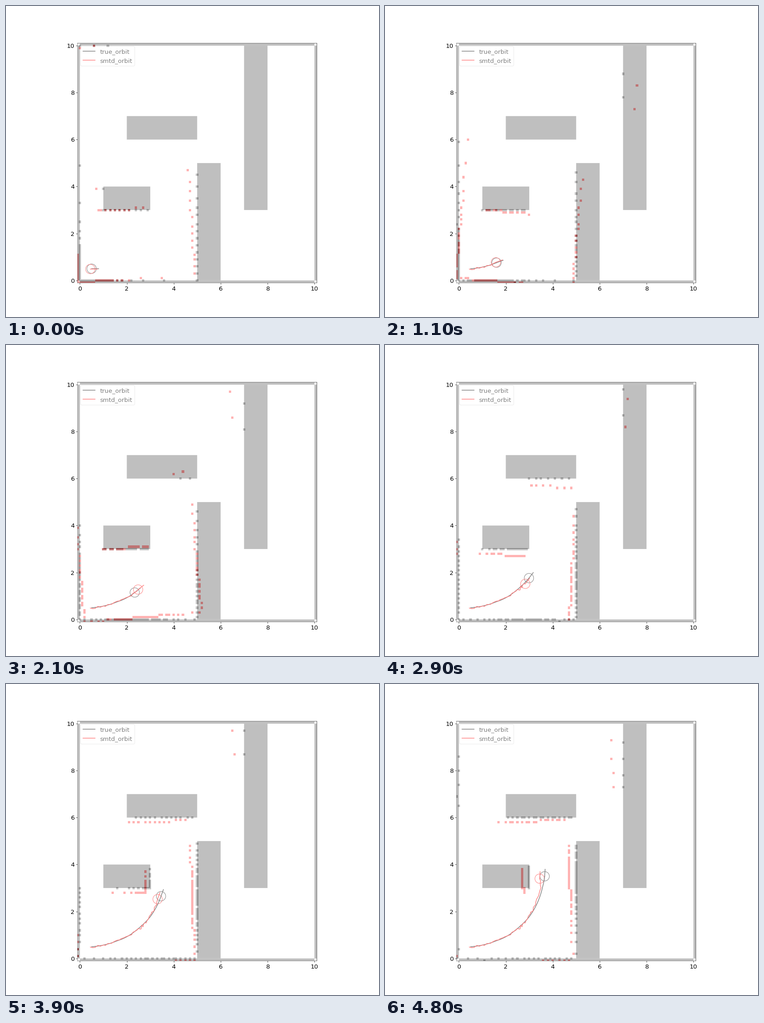
Animation, 820 px wide and 683 px high, one loop 4900 ms. Source, as a matplotlib script:

```python
import matplotlib.pyplot as plt
import numpy as np
from matplotlib.animation import FuncAnimation
from matplotlib.colors import ListedColormap
from matplotlib.patches import Circle, Rectangle

STEPS = 49
DPI = 64
S = 820 / 12 / DPI
SIZE, WALL = 10, 0.1
RADIUS, NOSE = 0.2, 0.3
TURN, SPEED = np.radians(1.8), 0.1
CELLS = 103

plt.rcParams.update({
    "font.family": "DejaVu Sans",
    "font.size": 14 * S,
    "path.snap": False,
    "lines.linewidth": 1.5 * S,
    "patch.linewidth": S,
    "axes.linewidth": 0.8 * S,
    **{f"{a}tick.major.{p}": v * S for a in "xy"
       for p, v in (("size", 3.5), ("width", 0.8), ("pad", 3.5))},
})

# Obstacles, then outer walls: x0, y0, x1, y1
BOXES = np.array([
    (1, 3, 3, 4), (2, 6, 5, 7), (5, 0, 6, 5), (7, 3, 8, SIZE),
    (-WALL, 0, 0, SIZE), (SIZE, 0, SIZE + WALL, SIZE),
    (0, -WALL, SIZE, 0), (0, SIZE, SIZE, SIZE + WALL),
])
RAYS = np.linspace(-np.pi, np.pi, 100)

# Key poses: step, true x and y, estimated x and y, estimated heading error
KEYS = np.array([
    (0, 0.5, 0.5, 0.445, 0.485, 0.061),
    (11, 1.605, 0.757, 1.575, 0.772, -0.088),
    (21, 2.337, 1.148, 2.483, 1.274, 0.086),
    (29, 2.987, 1.76, 2.832, 1.517, -0.05),
    (35, 3.3, 2.27, 3.16, 2.02, -0.01),
    (43, 3.57, 3.05, 3.452, 2.884, 0.023),
    (48, 3.657, 3.5, 3.442, 3.398, 0.04),
])

step = np.arange(STEPS)
key_steps = KEYS[:, 0].astype(int)
heading = TURN * step


def pin(path, targets):
    """Shift each column of path smoothly so it meets the key values."""
    gaps = (targets - path[key_steps]).T
    return path + np.column_stack([np.interp(step, key_steps, g) for g in gaps])


def ranges(p):
    """Distance from p to the nearest box along every ray."""
    x0, y0, x1, y1 = BOXES.T[:, :, None]
    c, s = np.cos(RAYS), np.sin(RAYS)
    tx = np.sort([(x0 - p[0]) / c, (x1 - p[0]) / c], axis=0)
    ty = np.sort([(y0 - p[1]) / s, (y1 - p[1]) / s], axis=0)
    near, far = np.maximum(tx[0], ty[0]), np.minimum(tx[1], ty[1])
    return np.where((near <= far) & (near > 0), near, 2 * SIZE).min(axis=0)


def hit_grid(p, dist, turn=0.0):
    """Mark the cells where the rays end."""
    x = p[0] + dist * np.cos(RAYS + turn)
    y = p[1] + dist * np.sin(RAYS + turn)
    i, j = (np.floor(v * 10).astype(int) + 1 for v in (x, y))
    ok = (i >= 0) & (i < CELLS) & (j >= 0) & (j < CELLS)
    grid = np.zeros((CELLS, CELLS))
    grid[j[ok], i[ok]] = 1
    return grid


rng = np.random.default_rng(7)
arc = np.column_stack([np.sin(heading), 1 - np.cos(heading)]) * SPEED / TURN
true_xy = pin(arc, KEYS[:, 1:3])
est_xy = pin(true_xy + rng.normal(0, 0.03, (STEPS, 2)), KEYS[:, 3:5])
error = pin(rng.normal(0, 0.04, (STEPS, 1)), KEYS[:, 5:])[:, 0]

fig, ax = plt.subplots(figsize=(820 / DPI, 683 / DPI), dpi=DPI)
for x0, y0, x1, y1 in BOXES:
    ax.add_patch(Rectangle((x0, y0), x1 - x0, y1 - y0, fc="gray", lw=0))


class Robot:
    def __init__(self, xy, color, label, z):
        self.xy = xy
        self.trail, = ax.plot([], [], color=color, label=label)
        self.nose, = ax.plot([], [], color=color)
        self.body = ax.add_patch(Circle(xy[0], RADIUS, fill=False, ec=color))
        # The translucent white of each scan layer also fades what lies below
        self.scan = ax.imshow(
            np.zeros((CELLS, CELLS)), cmap=ListedColormap(["white", color]),
            vmin=0, vmax=1, alpha=0.3, origin="lower", interpolation="nearest",
            extent=(-0.15, 10.15, -0.15, 10.15), zorder=z)

    def show(self, k, grid):
        x, y = self.xy[k]
        self.trail.set_data(*self.xy[:k + 1].T)
        self.nose.set_data([x, x + NOSE * np.cos(heading[k])],
                           [y, y + NOSE * np.sin(heading[k])])
        self.body.center = x, y
        self.scan.set_data(grid)


truth = Robot(true_xy, "black", "true_orbit", 10)
guess = Robot(est_xy, "red", "smtd_orbit", 11)

limits = (-WALL, SIZE + WALL)
ticks = range(0, SIZE + 1, 2)
ax.set(xlim=limits, ylim=limits, xticks=ticks, yticks=ticks, aspect="equal")
ax.legend(loc="upper left")


def update(k):
    dist = ranges(true_xy[k])
    truth.show(k, hit_grid(true_xy[k], dist))
    guess.show(k, hit_grid(est_xy[k], dist, error[k]))


anim = FuncAnimation(fig, update, frames=STEPS, interval=100,
                     repeat=True, repeat_delay=0)
plt.show()
```
